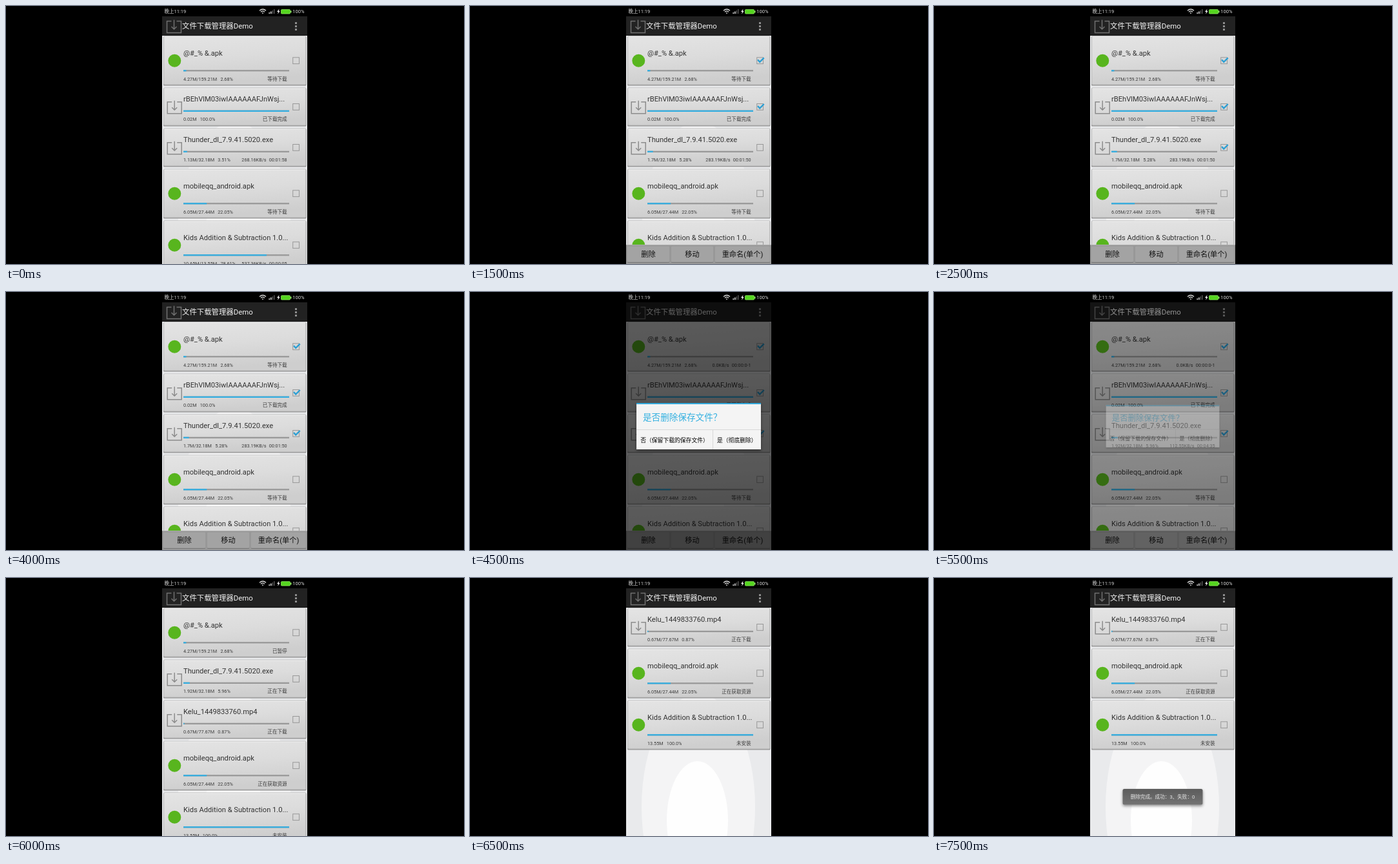
An HTML page for the animation above (8000 ms loop, 710 by 400 pixels).

```html
<!DOCTYPE html>
<html lang="zh">
<head>
<meta charset="utf-8">
<title>Download manager</title>
<style>
  html, body { margin: 0; width: 100%; height: 100%; overflow: hidden; background: #000; }
  svg { display: block; width: 710px; height: 400px; }
  text { font-family: Roboto, "Noto Sans CJK SC", "Noto Sans CJK", sans-serif; white-space: pre; }
  .name { font-size: 11.15px; fill: #333; }
  .small { font-size: 7.25px; fill: #3c3c3c; }
  .status { font-size: 7.6px; fill: #3c3c3c; }
  .end { text-anchor: end; }
  .mid { text-anchor: middle; }
</style>
</head>
<body>
<svg viewBox="0 0 710 400">
  <defs>
    <linearGradient id="card" x1="0" y1="0" x2="0.25" y2="1">
      <stop offset="0" stop-color="#e4e4e4"/><stop offset="0.5" stop-color="#dcdcdc"/><stop offset="1" stop-color="#cecece"/>
    </linearGradient>
    <linearGradient id="toastFill" x1="0" y1="0" x2="0" y2="1">
      <stop offset="0" stop-color="#5c5c5c"/><stop offset="1" stop-color="#737373"/>
    </linearGradient>
    <filter id="shadow" x="-10%" y="-20%" width="120%" height="150%">
      <feDropShadow dx="0" dy="2" stdDeviation="2" flood-opacity="0.45"/>
    </filter>
    <clipPath id="screen"><rect x="242" width="225" height="400"/></clipPath>
    <path id="tray" d="M-4-8.5h-7v18h22v-18h-7M0-10.5v14M-4 0l4 4 4-4" fill="none" stroke-width="1.5"/>
  </defs>
  <rect width="710" height="400"/>
  <g clip-path="url(#screen)">
    <rect x="242" y="46" width="225" height="354" fill="#e9eaec"/>
    <ellipse cx="354" cy="355" rx="88" ry="175" fill="#f4f4f5"/>
    <ellipse cx="352.5" cy="376" rx="47.5" ry="92" fill="#fefefe"/>
    <g id="list"></g>
    <g id="header">
      <rect x="242" y="16" width="225" height="30" fill="#222"/>
      <rect x="242" y="45" width="225" height="1" fill="#151515"/>
      <use href="#tray" x="260.5" y="32" stroke="#707070"/>
      <text x="273" y="35.3" font-size="11.4" fill="#f3f3f3">文件下载管理器Demo</text>
      <path d="M448 25h3v3h-3zm0 5h3v3h-3zm0 5h3v3h-3z" fill="#8d8d8d"/>
    </g>
    <g id="actions"></g>
    <rect id="dim" x="242" y="16" width="225" height="384"/>
    <g id="dialog">
      <rect x="258" y="172" width="193" height="72" fill="#f4f4f4" filter="url(#shadow)"/>
      <rect x="258" y="172" width="193" height="2" fill="#33a9dc"/>
      <path d="M258 213.5h193M376.5 213.5v30.5" stroke="#d8d8d8"/>
      <text x="268" y="198.9" font-size="13.6" fill="#33b0e0">是否删除保存文件？</text>
      <text class="mid" x="317" y="232.5" font-size="8.8">否（保留下载的保存文件）</text>
      <text class="mid" x="413.8" y="232.5" font-size="8.8">是（彻底删除）</text>
    </g>
    <g id="toast">
      <rect x="292.5" y="327" width="124" height="24.5" rx="2.5" fill="url(#toastFill)" filter="url(#shadow)"/>
      <text class="mid" x="354.5" y="341.5" font-size="7.6" fill="#e8e8e8">删除完成。成功：3、失败：0</text>
    </g>
    <rect x="242" width="225" height="16"/>
    <text x="245.5" y="11.4" font-size="7.5" fill="#d8d8d8">晚上11:19</text>
    <g fill="none" stroke="#ddd" stroke-width="1.3">
      <path d="M393 7.2q5-4.4 10 0M395 9.2q3-2.6 6 0"/>
      <path d="M398 10v2"/>
    </g>
    <path d="M407.5 10h1.5v2h-1.5zm2.5-1.5h1.5V12H410z" fill="#ddd"/>
    <path d="M412.5 7h1.5v5h-1.5zM415 5h1.5v7H415z" fill="#555"/>
    <path d="M423.5 4.5l-3.5 4.6h2l-.8 3.4 3.6-4.7h-2z" fill="#eee"/>
    <rect x="426.5" y="5.5" width="14" height="6.5" rx="1" fill="#55d51f" stroke="#8be65f" stroke-width=".8"/>
    <rect x="441" y="7.3" width="1.5" height="3" fill="#8be65f"/>
    <text x="444.3" y="11.4" font-size="7.6" fill="#d8d8d8">100%</text>
  </g>
</svg>
<script>
const LOOP = 8000;
const el = id => document.getElementById(id);
const escape = s => s.replace(/&/g, '&amp;');

const file = (name, size, percent, status, apk = false) => ({ name, size, percent, status, apk });

const waiting = '等待下载';
const stalled = ['0.0KB/s', '00:00:0-1'];
const symbols = status => file('@#_% &.apk', '4.27M/159.21M', '2.68%', status, true);
const done = file('rBEhVlM03iwIAAAAAAFJnWsj...', '0.02M', '100.0%', '已下载完成');
const installer = (size, percent, status) => file('Thunder_dl_7.9.41.5020.exe', size, percent, status);
const video = file('Kelu_1449833760.mp4', '0.67M/77.67M', '0.87%', '正在下载');
const mobile = status => file('mobileqq_android.apk', '6.05M/27.44M', '22.05%', status, true);
const kids = (size, percent, status) => file('Kids Addition & Subtraction 1.0...', size, percent, status, true);
const kidsDone = kids('13.55M', '100.0%', '未安装');

const before = (first, third) => [symbols(first), done, third, mobile(waiting),
  kids('10.65M/13.55M', '78.61%', ['537.36KB/s', '00:00:05'])];
const early = before(waiting, installer('1.13M/32.18M', '3.51%', ['268.16KB/s', '00:01:58']));
const later = before(waiting, installer('1.7M/32.18M', '5.28%', ['283.19KB/s', '00:01:50']));
const paused = before(stalled, installer('1.92M/32.18M', '5.96%', ['112.55KB/s', '00:04:35']));
const deleting = [symbols('已暂停'), installer('1.92M/32.18M', '5.96%', '正在下载'),
  video, mobile('正在获取资源'), kidsDone];
const remaining = [video, mobile('正在获取资源'), kidsDone];

const scenes = [
  { at: 0, files: early },
  { at: 500, files: early, checked: 1 },
  { at: 1000, files: early, checked: 2, pressed: 1 },
  { at: 1500, files: later, checked: 2 },
  { at: 2500, files: later, checked: 3 },
  { at: 4500, files: paused, checked: 3, dim: 0.6, dialog: 1 },
  { at: 5500, files: paused, checked: 3, dim: 0.4, dialog: 0.33, scale: 0.91 },
  { at: 6000, files: deleting },
  { at: 6500, files: remaining },
  { at: 7000, files: remaining, toast: 0.95 },
  { at: 7500, files: remaining, toast: 1 }
];

function statusText(status, y) {
  return Array.isArray(status)
    ? `<text class="small end" x="435.7" y="${y}">${status[0]}<tspan dx="4.3">${status[1]}</tspan></text>`
    : `<text class="status end" x="435.7" y="${y}">${status}</text>`;
}

function checkbox(y, checked, pressed) {
  const glow = pressed ? `<rect x="442" y="${y - 7.5}" width="15" height="15" rx="2" fill="#33b5e5" opacity=".35"/>` : '';
  const tick = checked ? `<path d="M446 ${y - 1.5}l3.2 3.5 6.5-6.5" fill="none" stroke="#2b9fd4" stroke-width="2.4"/>` : '';
  return `${glow}<rect x="444.7" y="${y - 5}" width="9.8" height="9.8" fill="none" stroke="#989898"/>${tick}`;
}

function card({ name, size, percent, status, apk }, top, checked, pressed) {
  const height = apk ? 76 : 59;
  const shift = apk ? 8.7 : 0;
  const middle = top + (apk ? 38.3 : 30);
  const bar = top + 36.3 + shift * 2;
  const base = top + 51.7 + shift * 2;
  const icon = apk
    ? `<circle cx="261.3" cy="${middle}" r="10" fill="#58b51e"/>`
    : `<use href="#tray" x="261.2" y="${middle + 0.8}" stroke="#8c8c8c"/>`;
  return `<rect x="244" y="${top + 1}" width="221.5" height="${height}" rx="1.5" fill="#8f8f8f"/>
    <rect x="244.5" y="${top + 0.5}" width="220.5" height="${height - 1}" rx="1.5" fill="url(#card)" stroke="#b5b5b5"/>
    <path d="M245.5 ${top + 1.5}h218.5" stroke="#f0f0f0"/>
    ${icon}
    <text class="name" x="275" y="${top + 21.6 + shift}">${escape(name)}</text>
    <rect x="275" y="${bar - 1.1}" width="164" height="2.3" fill="#999"/>
    <rect x="275" y="${bar - 1.1}" width="${1.64 * parseFloat(percent)}" height="2.3" fill="#36aee0"/>
    <text class="small" x="275" y="${base}">${size}<tspan dx="5.3">${percent}</tspan></text>
    ${statusText(status, base)}${checkbox(middle, checked, pressed)}`;
}

function cards({ files, checked = 0, pressed = -1 }) {
  let top = 46.5;
  return files.map((item, i) => {
    const markup = card(item, top, i < checked, i === pressed);
    top += item.apk ? 80 : 63;
    return markup;
  }).join('');
}

const action = (label, x, width) =>
  `<rect x="${x}" y="373" width="${width}" height="25" rx="1" fill="#777"/>
   <rect x="${x}" y="372.5" width="${width}" height="24.5" rx="1" fill="#a3a3a3"/>
   <text class="mid" x="${x + width / 2}" y="389.3" font-size="11.2" fill="#111">${label}</text>`;

el('actions').innerHTML = '<rect x="242" y="370" width="225" height="30" fill="#989898"/>'
  + '<rect x="242" y="370" width="225" height="1" fill="#aeaeae"/>'
  + action('删除', 244, 65) + action('移动', 312, 65) + action('重命名(单个)', 380, 85);

let shown;
function render(time) {
  const scene = scenes.findLast(s => s.at <= time % LOOP);
  if (scene === shown) return;
  shown = scene;
  const { checked = 0, dim = 0, dialog = 0, scale = 1, toast = 0 } = scene;
  el('list').innerHTML = cards(scene);
  el('actions').setAttribute('opacity', checked ? 1 : 0);
  el('dim').setAttribute('opacity', dim);
  el('dialog').setAttribute('opacity', dialog);
  el('dialog').setAttribute('transform', `translate(354.5 208.7) scale(${scale}) translate(-354.5 -208.7)`);
  el('toast').setAttribute('opacity', toast);
}

const start = performance.now();
function tick() {
  render(performance.now() - start);
  requestAnimationFrame(tick);
}
tick();
</script>
</body>
</html>
```
